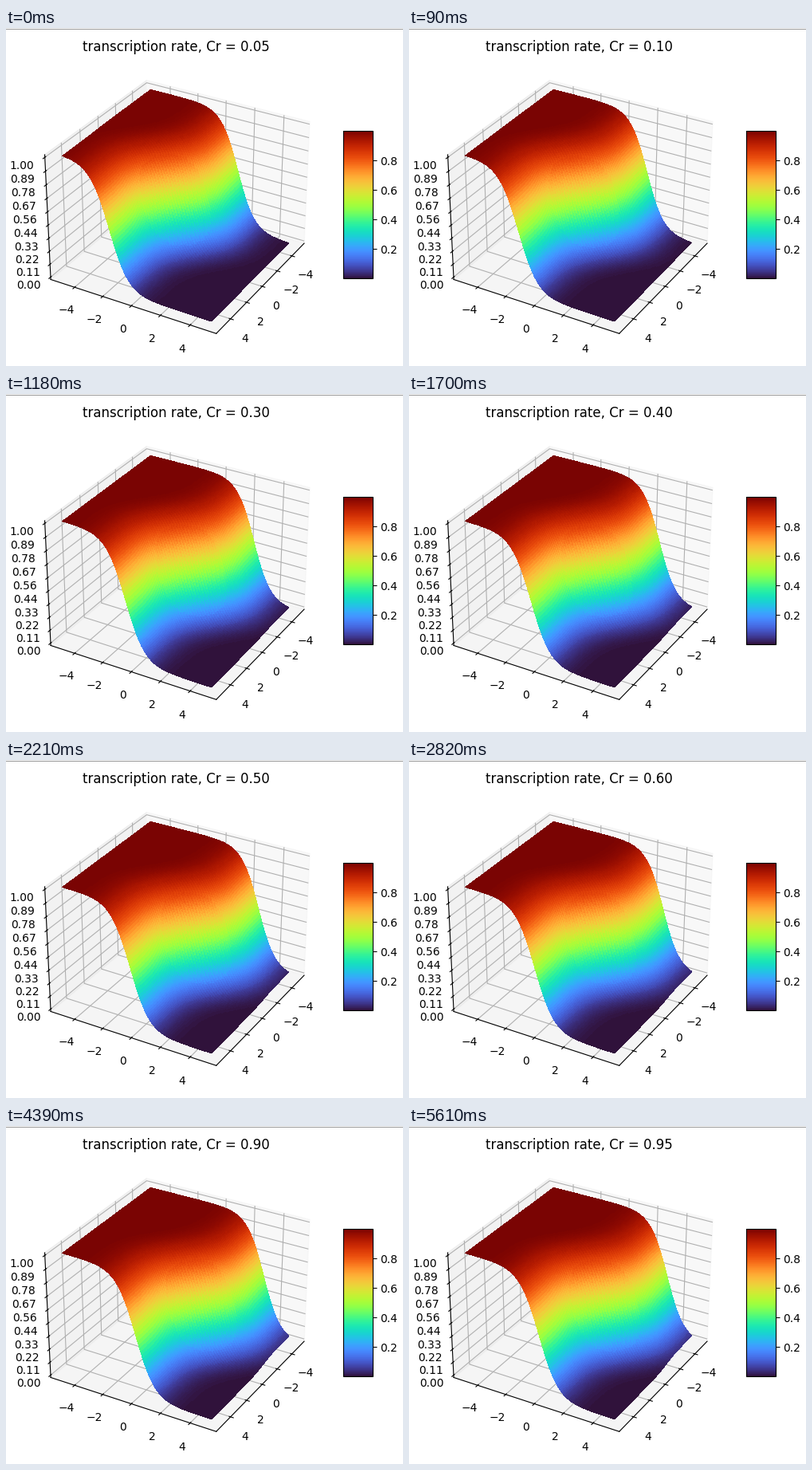
Animation, 498 px wide and 424 px high, one loop 5880 ms. Source, as a matplotlib script:

```python
import numpy as np
import matplotlib.pyplot as plt
from matplotlib.animation import FuncAnimation
from matplotlib.cm import ScalarMappable
from matplotlib.colors import Normalize
from matplotlib.lines import Line2D

W, H, DPI = 498, 424, 100
LOOP, STEP = 5880, 30
# Moments (ms) at which Cr grows by 0.05
STARTS = [0, 30, 300, 550, 820, 1180, 1450, 1700, 1940, 2210, 2610,
          2820, 3060, 3300, 3520, 3880, 4150, 4390, 4640]
NORM = Normalize(0.002, 0.998)
HILL = 1.6

fig = plt.figure(figsize=(W / DPI, H / DPI), dpi=DPI)


def pixel_rect(left, bottom, width, height):
    return [left / W, bottom / H, width / W, height / H]


def rate(x, y, cr):
    """Hill-type response with a saturating shift along x."""
    gain = (1 + np.exp(2.6 - HILL * x)) / (1 + np.exp(-2.5 - HILL * x))
    return cr * gain / (cr * gain + np.exp(HILL * y))


def build_scene():
    ax = fig.add_axes(pixel_rect(28.2, 17.4, 369.6, 369.6), projection="3d")
    ax.view_init(30, 30)
    side = 5.5 * 25 / 24
    ax.set(xlim=(-side, side), ylim=(-side, side), zlim=(-1 / 48, 49 / 48))
    ax.set_xticks(range(-4, 5, 2))
    ax.set_yticks(range(-4, 5, 2))
    ax.set_zticks(np.linspace(0, 1, 10))
    ax.zaxis.set_major_formatter("{x:.02f}")
    cax = fig.add_axes(pixel_rect(422.6, 109.8, 36.96, 184.8))
    fig.colorbar(ScalarMappable(NORM, "turbo"), cax=cax,
                 ticks=[0.2, 0.4, 0.6, 0.8])
    fig.add_artist(Line2D([0, 1], [1 - 0.5 / H] * 2, color="#989898",
                          lw=72 / DPI))
    return ax


def render_states():
    ax = build_scene()
    x, y = np.meshgrid(np.linspace(-5, 5, 80), np.linspace(-5, 5, 150))
    shots = []
    for k in range(len(STARTS)):
        cr = 0.05 * (k + 1)
        ax.set_title(f"transcription rate, Cr = {cr:.2f}")
        surf = ax.plot_surface(x, y, rate(x, y, cr), cmap="turbo", norm=NORM,
                               rcount=150, ccount=80, linewidth=0,
                               antialiased=False)
        fig.canvas.draw()
        shots.append(np.array(fig.canvas.buffer_rgba()))
        surf.remove()
    fig.clear()
    return shots


# Each state is drawn once; playback only swaps the finished pictures.
states = render_states()
picture = fig.figimage(states[0])


def update(i):
    now = i * STEP + 20
    picture.set_data(states[np.searchsorted(STARTS, now, side="right") - 1])
    return [picture]


anim = FuncAnimation(fig, update, frames=LOOP // STEP, interval=STEP,
                     repeat=True, repeat_delay=0)
plt.show()
```
